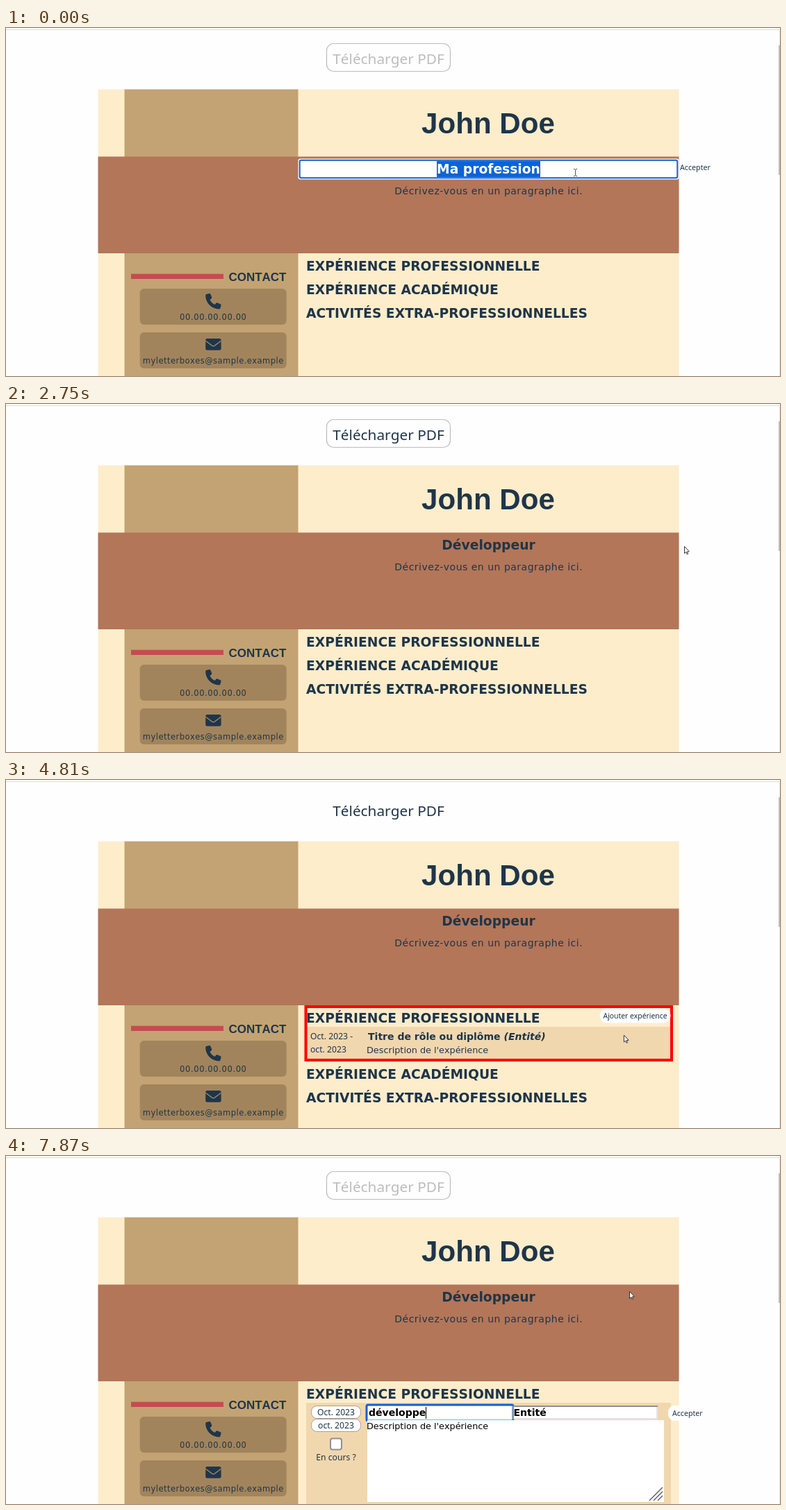
Recreate the animation shown at these times as an HTML page with a canvas. Size 1114 px wide and 502 px high, loop 7990 ms.

```html
<!DOCTYPE html>
<html lang="fr">
<head>
<meta charset="utf-8">
<title>CV</title>
<style>
html, body { margin: 0; width: 100%; height: 100%; overflow: hidden; background: #fefefe; }
canvas { display: block; }
</style>
</head>
<body>
<canvas id="stage" width="1114" height="502"></canvas>
<script>
const ctx = document.getElementById('stage').getContext('2d');
ctx.fontKerning = 'none';
const LOOP = 7990;
const INK = '#1f3549', CREAM = '#feedcb', TAN = '#c3a373', BAND = '#b37659';
const BOX = '#a2845c', BLUE = '#0b63d8', RED = '#fe0000', ENTRY = '#f1d7ae';
const DEJAVU = '"DejaVu Sans", sans-serif';
const UI = '"Noto Sans", "Open Sans", sans-serif';
const ARIAL = '"Liberation Sans", Arial, sans-serif';
const H3 = 'bold 18.72px ' + DEJAVU;
const H4 = 'bold 14.04px ' + DEJAVU;
const BODY = '12.8px ' + DEJAVU;
const DATE = '12.2px ' + UI;

const JOB = 'Développeur', ROLE = 'développe', OLD_ROLE = 'Titre de rôle ou diplôme';
const jobKeys = [120, 300, 480, 670, 790, 910, 1080, 1180, 1280, 1370, 1470];
const roleKeys = [6710, 6960, 7140, 7220, 7310, 7490, 7690, 7780, 7870];

// Pointer hot spot: time, x, y
const path = [
  [0, 819, 208], [2090, 819, 208], [2300, 900, 210], [2480, 985, 207], [2700, 976, 205],
  [2980, 976, 205], [3200, 960, 255], [3420, 932, 325], [3620, 920, 345],
  [4220, 920, 345], [4600, 900, 362], [4980, 880, 372], [5100, 880, 372], [5740, 640, 371],
  [6160, 640, 371], [6400, 897, 195], [LOOP, 897, 195]
];

function pointerAt(t) {
  let i = 1;
  while (i < path.length - 1 && t >= path[i][0]) i++;
  const [t0, x0, y0] = path[i - 1], [t1, x1, y1] = path[i];
  const k = Math.min(1, (t - t0) / (t1 - t0));
  return [x0 + (x1 - x0) * k, y0 + (y1 - y0) * k];
}

function typed(word, keys, t) {
  return word.slice(0, keys.filter(k => t >= k).length);
}

function rect(x, y, w, h, color) {
  ctx.fillStyle = color;
  ctx.fillRect(x, y, w, h);
}

function round(x, y, w, h, r, fill, line, width = 1) {
  ctx.beginPath();
  ctx.roundRect(x, y, w, h, r);
  if (fill) { ctx.fillStyle = fill; ctx.fill(); }
  if (line) { ctx.strokeStyle = line; ctx.lineWidth = width; ctx.stroke(); }
}

function text(str, x, y, font, color = INK, align = 'left', gap = 0) {
  ctx.font = font;
  ctx.fillStyle = color;
  ctx.textAlign = align;
  ctx.letterSpacing = gap + 'px';
  ctx.fillText(str, x, y);
  const w = ctx.measureText(str).width;
  ctx.letterSpacing = '0px';
  return w;
}

function poly(points, fill, line, width = 1) {
  ctx.beginPath();
  points.forEach(([x, y]) => ctx.lineTo(x, y));
  ctx.closePath();
  ctx.fillStyle = fill;
  ctx.fill();
  ctx.strokeStyle = line;
  ctx.lineWidth = width;
  ctx.stroke();
}

function phoneIcon(x, y) {
  ctx.save();
  ctx.translate(x, y);
  ctx.scale(22.4 / 512, 22.4 / 512);
  ctx.fillStyle = INK;
  ctx.fill(new Path2D('M165 25C157 6 137-4 117 1L29 25C12 30 0 46 0 64C0 311 201 512 448 512' +
    'c18 0 34-12 39-30l24-88c5-19-5-39-23-47l-96-40c-17-7-36-2-47 12L305 368' +
    'C234 335 177 278 144 207L193 167c14-11 19-30 12-46z'));
  ctx.restore();
}

function mailIcon(x, y) {
  round(x, y, 22.4, 16.8, 2.5, INK);
  ctx.beginPath();
  ctx.moveTo(x, y + 3.2);
  ctx.lineTo(x + 9.6, y + 10.4);
  ctx.quadraticCurveTo(x + 11.2, y + 11.4, x + 12.8, y + 10.4);
  ctx.lineTo(x + 22.4, y + 3.2);
  ctx.strokeStyle = BOX;
  ctx.lineWidth = 1.4;
  ctx.stroke();
}

function drawPage(t) {
  rect(0, 0, 1114, 502, '#fefefe');
  rect(0, 2, 1114, 1, '#dcdcdc');
  rect(1113, 3, 1, 499, '#e6e6e6');
  rect(1112, 25, 2, 187, '#bdbdbd');

  const editing = t < 2600 || t >= 5040;
  if (t < 3000 || t >= 5150) round(461.5, 22.5, 178, 40, 10, '#fefefe', '#bcbcbc', 1.2);
  text('Télécharger PDF', 550.5, 52, '20.8px ' + UI, editing ? '#bdbdbd' : INK, 'center');

  rect(132.5, 88.5, 836, 413.5, CREAM);
  rect(170.5, 88.5, 250, 413.5, TAN);
  rect(132.5, 185.5, 836, 139.5, BAND);
  text('John Doe', 694, 152, 'bold 42.1px ' + ARIAL, INK, 'center');
  text('Décrivez-vous en un paragraphe ici.', 694.7, 240, '14px ' + DEJAVU, INK, 'center', 0.5);

  rect(180, 354.7, 133, 7.3, '#c24d54');
  text('CONTACT', 403.5, 364.5, 'bold 17px ' + ARIAL, INK, 'right');
  round(192.7, 376, 211, 52, 6, BOX);
  round(192.7, 439, 211, 52, 6, BOX);
  phoneIcon(287.2, 383);
  mailIcon(287.2, 448);
  const small = '11.5px ' + DEJAVU;
  text('00.00.00.00.00', 298.3, 421, small, INK, 'center', 0.62);
  text('myletterboxes@sample.example', 298.3, 483.5, small, INK, 'center', 0.46);
}

function drawJob(t, mx) {
  if (t >= 2600) {
    text(JOB, 694.5, 210, H3, INK, 'center');
    return;
  }
  round(420.5, 188.5, 548, 30, 3, '#fff');
  round(422.7, 190.8, 543.6, 25.5, 2, '#fff', BLUE, 2);
  if (t < 120) {
    rect(620, 192, 149, 23, BLUE);
    text('Ma profession', 694.5, 210, H3, '#fff', 'center');
  } else {
    const w = text(typed(JOB, jobKeys, t), 694.5, 210, H3, '#000', 'center');
    if (t < 1720) rect(Math.round(694.5 + w / 2), 192, 1, 23, '#000');
  }
  if (mx > 968) round(965.5, 190.5, 53, 22, 9, '#fefefe', '#646cff');
  text('Accepter', 970, 205, '10.7px ' + UI);
}

function field(x, y, w, h) {
  rect(x, y, w, h, '#fff');
  rect(x, y + h - 2, w, 2, '#e4e4e4');
  rect(x + w - 2, y, 2, h, '#e4e4e4');
  rect(x, y, w, 2, '#8f8f8f');
  rect(x, y, 2, h, '#8f8f8f');
}

function drawForm(t) {
  rect(432, 356, 525, 146, ENTRY);
  round(439.5, 360.5, 71, 18, 8, '#fff', '#a5a09a');
  round(439.5, 379.5, 71, 18, 8, '#fff', '#a5a09a');
  text('Oct. 2023', 475, 374, DATE, INK, 'center');
  text('oct. 2023', 475, 392.5, DATE, INK, 'center');
  round(467, 407.5, 16, 16, 3, '#fff', '#8f8f9d', 2);
  text('En cours ?', 475, 438.5, DATE, INK, 'center');

  if (t < 5850) field(520, 360, 208, 20);
  else round(519, 359, 211, 23, 2, '#fff', BLUE, 3);
  field(729, 360, 209, 20);
  rect(520, 381, 427, 118, '#fff');

  if (t < 6710) {
    const picked = t >= 6160;
    if (picked) rect(522, 362, 191, 17, BLUE);
    text(OLD_ROLE, 522, 375, H4, picked ? '#fff' : '#000');
  } else {
    const w = text(typed(ROLE, roleKeys, t), 522, 375, H4, '#000');
    rect(Math.round(522 + w), 362, 1, 17, '#000');
  }
  text('Entité', 730.5, 375, H4, '#000');
  text('Description de l\'expérience', 519, 394, BODY, '#000');

  ctx.beginPath();
  for (const d of [19, 13, 7]) {
    ctx.moveTo(945 - d, 497);
    ctx.lineTo(945, 497 - d);
  }
  ctx.strokeStyle = '#555';
  ctx.lineWidth = 1.3;
  ctx.stroke();

  ctx.globalAlpha = Math.min(1, 0.7 + (t - 5040) / 500);
  round(953, 360, 50, 22, 9, '#fefefe');
  ctx.globalAlpha = 1;
  text('Accepter', 959, 374.5, '10.6px ' + UI);
}

function drawSections(t) {
  const added = t >= 4040, open = t >= 5040;
  const hover = t >= 3420 && !open;
  if (open) drawForm(t);
  else if (added) {
    rect(432, 356, 525, 47, ENTRY);
    text('Oct. 2023 -', 438, 374, DATE);
    text('oct. 2023', 438, 392.5, DATE);
    const w = text(OLD_ROLE + ' ', 521, 375, H4);
    text('(Entité)', 521 + w, 375, 'italic ' + H4);
    text('Description de l\'expérience', 519, 394, BODY);
  }
  text('EXPÉRIENCE PROFESSIONNELLE', 432, 350, H3);
  if (!open) {
    const dy = added ? 47 : 0;
    text('EXPÉRIENCE ACADÉMIQUE', 432, 384 + dy, H3);
    text('ACTIVITÉS EXTRA-PROFESSIONNELLES', 432, 417.5 + dy, H3);
  }
  if (hover) {
    ctx.strokeStyle = RED;
    ctx.lineWidth = 4;
    ctx.strokeRect(431.5, 327, 526.5, added ? 77 : 31);
    const fade = Math.max(0, Math.min(1, (t - 3500) / 200, (4650 - t) / 250));
    round(854.5, 329.5, 102, 21, 10, '#fefefe', `rgba(100,108,255,${fade})`, 1.4);
    text('Ajouter expérience', 905.5, 344, '10.35px ' + UI, INK, 'center');
  }
}

function arrow(x, y) {
  poly([[0, 0], [0, 10], [2.3, 8], [3.8, 11.3], [5.2, 10.7], [3.8, 7.5], [6.8, 7.3]]
    .map(([a, b]) => [x + a, y + b]), '#fff', '#333');
}

function beam(x, y) {
  rect(x - 0.5, y - 4, 1, 9, '#555');
  for (const dy of [-5, 5]) {
    rect(x - 2.5, y + dy, 2, 1, '#555');
    rect(x + 0.5, y + dy, 2, 1, '#555');
  }
}

function hand(x, y) {
  poly([[-1, 1], [0, 0], [1, 1], [1, 5], [5, 6], [7, 7.5], [7, 10], [5.5, 13], [0.5, 13],
    [-3, 8.5], [-2.5, 7.5], [-1, 8.5]].map(([a, b]) => [x + a, y + b]), '#fff', '#333');
}

function drawPointer(t, x, y) {
  const onAdd = t >= 3790 && t < 4450;
  const onAccept = t < 2600 && x > 968;
  const onField = (t < 2600 && x < 967) || (t >= 5040 && y > 360);
  if (onAdd || onAccept) hand(x, y);
  else if (onField) beam(Math.round(x) + 0.5, Math.round(y));
  else arrow(x + 0.5, y + 0.5);
}

function frame(now) {
  const t = now % LOOP;
  const [x, y] = pointerAt(t);
  drawPage(t);
  drawJob(t, x);
  drawSections(t);
  drawPointer(t, x, y);
  requestAnimationFrame(frame);
}
requestAnimationFrame(frame);
</script>
</body>
</html>
```
